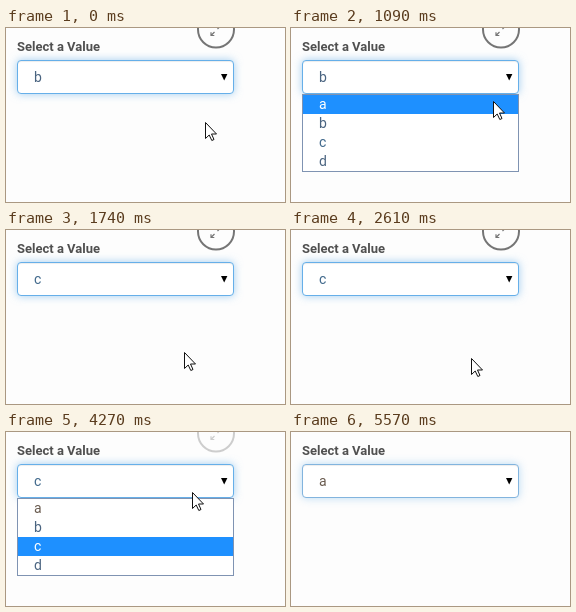
Recreate the animation shown at these times as an HTML page. Size 279 by 174 pixels, loop 5.67 s.

```html
<!DOCTYPE html>
<html lang="en">
<head>
<meta charset="utf-8">
<title>Select a Value</title>
<style>
  html, body { margin: 0; width: 100%; height: 100%; overflow: hidden; background: #fdfdfd; }
  #stage { position: relative; width: 279px; height: 174px; overflow: hidden;
    font: 14px/19px Roboto, "Liberation Sans", sans-serif; }
  #stage > * { position: absolute; box-sizing: border-box; }
  #label { left: 11px; top: 11px; font-size: 13px; line-height: 16px; font-weight: 700;
    color: #505050; white-space: nowrap; }
  #field { left: 11px; top: 32px; width: 217px; height: 34px; padding-left: 16px; line-height: 32px;
    background: #fff; border: 1px solid #66afe9; border-radius: 4px;
    box-shadow: inset 0 1px 1px rgba(0,0,0,.075), 0 0 8px rgba(102,175,233,.6); }
  #field.dim { border-color: #82b4de;
    box-shadow: inset 0 1px 1px rgba(0,0,0,.075), 0 0 8px rgba(102,175,233,.45); }
  #list { left: 11px; top: 66px; width: 217px; height: 78px; background: #fff; border: 1px solid #7f93b2; }
  #list div { height: 19px; padding-left: 16px; }
  #list .on { background: #1e90ff; color: #fff; }
  .a { color: #6a5c50; }
  .b, .d { color: #4a6480; }
  .c { color: #41698c; }
  svg { left: 0; top: 0; overflow: visible; }
</style>
</head>
<body>
<div id="stage">
  <div id="label">Select a Value</div>
  <div id="field"></div>
  <div id="list"></div>
  <svg width="279" height="174">
    <path d="M215 46h6.4l-3.2 6.4z" fill="#000"/>
    <g id="expand" fill="none" stroke="#757575">
      <circle cx="210" cy="1.5" r="18" stroke-width="2"/>
      <path d="M205 4.2V7.5H208.3M205 7.5L208.5 4M211.5 1L215 -2.5" stroke-width="1.2"/>
    </g>
    <path id="cursor" d="M.5 .5V16.5L4.2 13 6.8 18.5 9 17.5 6.5 12H11.5Z"
      fill="#fff" stroke="#111" stroke-linejoin="round"/>
  </svg>
</div>
<script>
const LOOP = 5670, ROW_TOP = 67, ROW_HEIGHT = 19, values = ['a', 'b', 'c', 'd'];
const $ = id => document.getElementById(id);

// Each step lists only what changes; at: cursor tip, ring: expand button opacity.
const steps = [
  [0,    { at: [199, 94], value: 'b', open: false, ring: 1, dim: false }],
  [280,  { at: [204, 81] }],
  [400,  { at: [210, 65] }],
  [550,  { at: [211, 57] }],
  [670,  { at: [212, 49] }],
  [940,  { open: true }],
  [1090, { at: [202, 73] }],
  [1215, { at: [187, 101] }],
  [1340, { at: [178, 122] }],
  [1740, { open: false, value: 'c' }],
  [2610, { at: [180, 128] }],
  [2735, { at: [228, 157], ring: .6 }],
  [2860, { at: null, ring: 0 }],
  [3610, { at: [220, 105] }],
  [3760, { at: [217, 84] }],
  [3885, { at: [212, 60] }],
  [4000, { at: [209, 45] }],
  [4150, { open: true, ring: .1 }],
  [4270, { at: [186, 60], ring: .35 }],
  [4400, { at: [181, 71], ring: .65 }],
  [4520, { at: [180, 76], ring: .9 }],
  [4650, { ring: 1 }],
  [4770, { open: false, value: 'a' }],
  [5050, { at: [186, 92] }],
  [5175, { at: [204, 112], ring: .6 }],
  [5300, { at: null, ring: 0 }],
  [5570, { dim: true }]
];

const rows = values.map(v => {
  const row = document.createElement('div');
  row.textContent = v;
  $('list').append(row);
  return row;
});

let state = {};
const states = steps.map(([time, change]) => [time, state = { ...state, ...change }]);

// The row under the pointer is lit, or the current value when it is above the list.
function litRow({ at, value }) {
  const hover = at ? Math.floor((at[1] - ROW_TOP) / ROW_HEIGHT) : -1;
  return hover >= 0 && hover < values.length ? hover : values.indexOf(value);
}

function draw(s) {
  $('field').textContent = s.value;
  $('field').className = s.value + (s.dim ? ' dim' : '');
  $('list').style.display = s.open ? 'block' : 'none';
  const lit = litRow(s);
  rows.forEach((row, i) => row.className = i === lit ? 'on' : values[i]);
  $('expand').style.opacity = s.ring;
  $('cursor').style.display = s.at ? '' : 'none';
  if (s.at) $('cursor').setAttribute('transform', `translate(${s.at})`);
}

const start = performance.now();
let shown;
function tick() {
  const t = (performance.now() - start) % LOOP;
  const [, next] = states.findLast(([time]) => time <= t) || states[0];
  if (next !== shown) draw(shown = next);
  requestAnimationFrame(tick);
}
tick();
</script>
</body>
</html>
```
